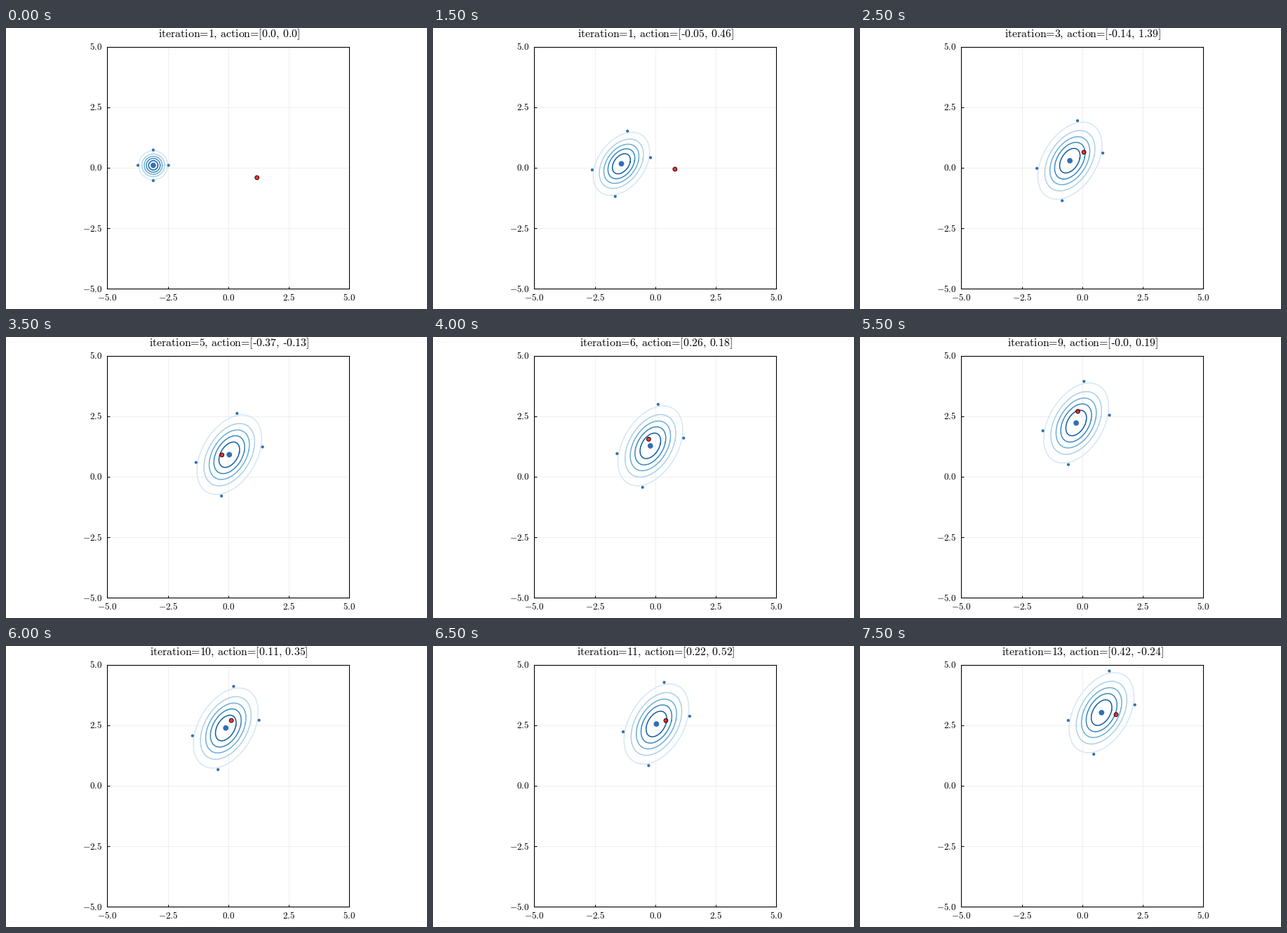
Animation of 600x400 px, one loop 8000 ms. Source, as a matplotlib script:

```python
import numpy as np
import matplotlib.pyplot as plt
from matplotlib.animation import FuncAnimation
from matplotlib.patches import Circle

W, H, DPI = 600, 400, 100
PX = 72 / DPI                          # one pixel in points
LEFT, TOP, SIDE = 144.4, 26.6, 344.6   # plot box in pixels
UNIT = SIDE / 10                       # pixels per data unit
HOLD, LAST = 2, 13                     # extra ticks on the first state, final step
BLUE = "#3070b5"

plt.rcParams["mathtext.fontset"] = "cm"

# Key points as x + yj; steps between them are interpolated
KEYS = [0, 3, 5, 7, 9, 11, 13]
TRUTH = [1.19 - .41j, .07 + .64j, -.26 + .9j, -.28 + 2.2j, -.18 + 2.7j, .44 + 2.69j, 1.4 + 2.94j]
BELIEF = [-.5 + .1j, -.39 + .29j, .06 + .91j, -.45 + 1.64j, -.25 + 2.22j, .05 + 2.55j, .8 + 3.02j]
ACTION = [0, -.14 + 1.39j, -.37 - .13j, .88 + .49j, -.001 + .19j, .22 + .52j, .42 - .24j]


def at(k, points):
    z = np.interp(k, KEYS, points)
    return np.array([z.real, z.imag])


def belief(k):
    """Estimated position: the path plus a start error that dies out."""
    return at(k, BELIEF) - [2.6 * .36 ** k, 0]


def spread(k):
    """Symmetric square root of four times the covariance after k steps."""
    xx = 2.0 - 1.6 * .3 ** k
    yy = 3.058 - 2.658 * .44 ** k
    xy = .996 * (1 - .35 ** k)
    s = np.sqrt(xx * yy - xy * xy)
    return np.array([[xx + s, xy], [xy, yy + s]]) / np.sqrt(xx + yy + 2 * s)


def label(x, y, text, size, ha="center"):
    return fig.text(x / W, 1 - y / H, text, fontsize=size * PX, ha=ha, va="baseline")


def dot(size, fill, edge="none", z=4):
    return ax.add_patch(Circle((0, 0), size / 2 / UNIT, fc=fill, ec=edge, lw=.9 * PX, zorder=z))


fig = plt.figure(figsize=(W / DPI, H / DPI), dpi=DPI, facecolor="white")
ax = fig.add_axes([LEFT / W, 1 - (TOP + SIDE) / H, SIDE / W, SIDE / H])
ax.set(xlim=(-5, 5), ylim=(-5, 5))
values = np.linspace(-5, 5, 5)
ax.set_xticks(values)
ax.set_yticks(values)
ax.tick_params(direction="in", length=3.5 * PX, width=PX,
               labelbottom=False, labelleft=False)
ax.grid(color="black", alpha=.1, lw=.6 * PX)
ax.set_axisbelow(True)
for spine in ax.spines.values():
    spine.set_linewidth(1.1 * PX)

for v in values:
    pos = (v + 5) * UNIT
    label(LEFT + pos, 387.5, f"${v:.1f}$", 13)
    label(137, TOP + SIDE - pos + 4.5, f"${v:.1f}$", 13, "right")

title = label(317.7, 13, "", 15.82)

# Contours at k/6 of the peak of a Gaussian
LEVELS = np.arange(1, 6) / 6
RADII = np.sqrt(-2 * np.log(LEVELS))
rings = [ax.plot([], [], color=plt.cm.Blues(v), lw=1.5 * PX)[0] for v in LEVELS]
angle = np.linspace(0, 2 * np.pi, 121)
circle = np.array([np.cos(angle), np.sin(angle)])

center = dot(7.8, BLUE)
sigma = [dot(4.2, BLUE) for _ in range(4)]
target = dot(5.8, (1, 0, 0, .8), "black", 5)


def update(i):
    k = max(0, i - HOLD)
    mean, root = belief(k), spread(k)
    for ring, r in zip(rings, RADII):
        ring.set_data(*(mean[:, None] + r / 2 * root @ circle))
    for d, offset in zip(sigma, [*root, *-root]):
        d.center = mean + offset
    center.center = mean
    target.center = at(k, TRUTH)
    action = ", ".join(str(round(float(a), 2)) for a in at(k, ACTION)).replace("-", "\u2010")
    title.set_text(rf"$\text{{iteration={max(k, 1)}, action=[{action}]}}$")
    return [*rings, *sigma, center, target, title]


anim = FuncAnimation(fig, update, frames=LAST + 1 + HOLD, interval=500, repeat=True)
plt.show()
```
